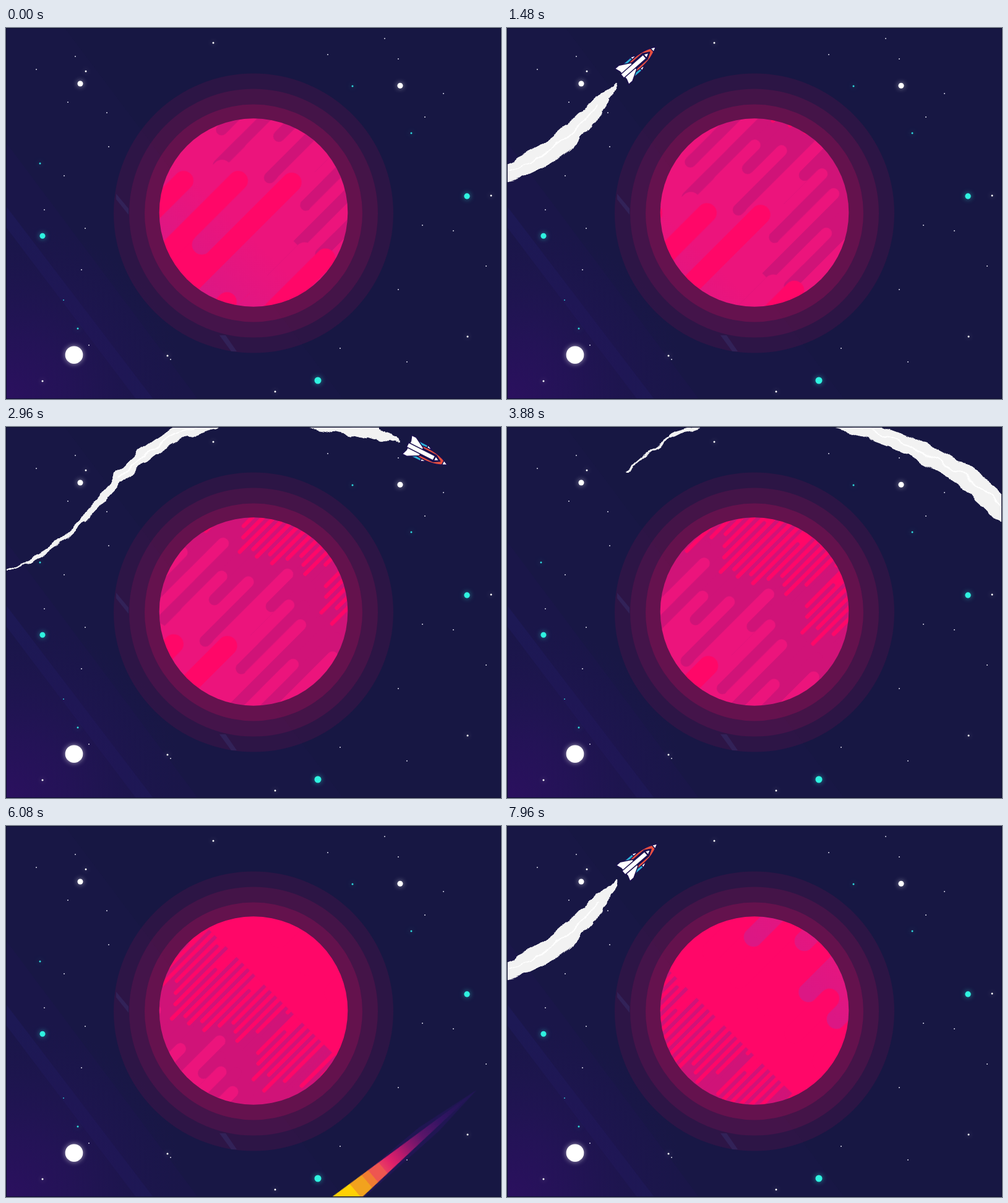
Write an HTML page without scripts that moves like this. It is 800x600 px and loops after 8 s.

```html
<!DOCTYPE html>
<html lang="en">
<head>
<meta charset="utf-8">
<title>Rocket and planet</title>
<style>
  html, body { margin: 0; width: 100%; height: 100%; overflow: hidden; background: #171743; }
  svg { display: block; width: 100%; height: 100%; }

  .red { fill: #ff0768; stroke: #ff0768; }
  .dark { fill: #d01378; stroke: #d01378; }
  .pink { fill: url(#pink); stroke: url(#pink); }
  .round { stroke-linecap: round; }
  .planet rect { stroke: none; }
  .planet path { fill: none; }
  .wide { stroke-width: 45; }
  .mid { stroke-width: 26; }
  .thin { stroke-width: 9; }
  .surface { animation: spin 8s linear infinite; }
  @keyframes spin { to { transform: translateX(-562.4px); } }

  .dots { fill: none; stroke-linecap: round; }
  .glow { filter: drop-shadow(0 0 4px #fff9); }
  .glow.cyan { filter: drop-shadow(0 0 4px #2fe9df99); }
  .pulse circle { transform-box: fill-box; transform-origin: center; opacity: 0; animation: pulse 8s linear infinite; }
  @keyframes pulse {
    0%, 21.5% { transform: scale(1); opacity: 0; }
    23% { transform: scale(1.5); opacity: .08; }
    26.5% { transform: scale(2.8); opacity: .035; }
    34%, 100% { transform: scale(4); opacity: 0; }
  }
  .blink { animation: blink 8s linear infinite; }
  @keyframes blink { 0%, 68%, 84%, 100% { opacity: 1; } 74%, 78% { opacity: 0; } }

  .rocket {
    offset-path: path("M-80 250C20 240 85 198 140 132S250 10 330 -8S470 -25 545 -6S740 60 805 138L870 220");
    offset-rotate: auto;
    animation: fly 8s linear infinite;
  }
  @keyframes fly {
    0%, 5% { offset-distance: 0%; }
    46.75%, 85.87% { offset-distance: 100%; }
    85.88% { offset-distance: 0%; }
    100% { offset-distance: 33.8%; }
  }

  /* Path length is in milliseconds: each layer shows smoke aged --a to --b. */
  .smoke use {
    stroke-dasharray: calc((var(--b) - var(--a)) * 1px) 9000px;
    animation: trail 8s linear infinite;
  }
  @keyframes trail {
    0% { stroke-dashoffset: calc((var(--b) + 400) * 1px); }
    85.87% { stroke-dashoffset: calc((var(--b) - 6470) * 1px); }
    85.88% { stroke-dashoffset: calc(var(--b) * 1px); }
    100% { stroke-dashoffset: calc((var(--b) - 1130) * 1px); }
  }

  .comet { animation: fall 8s linear infinite; }
  @keyframes fall {
    0%, 67.5% { transform: translate(1284px, -9px); }
    82.5%, 100% { transform: translate(362px, 759px); }
  }
</style>
</head>
<body>
<svg viewBox="0 0 800 600" preserveAspectRatio="none">
  <defs>
    <radialGradient id="corner" gradientUnits="userSpaceOnUse" cx="0" cy="600" r="290">
      <stop offset="0" stop-color="#2b105f"/>
      <stop offset=".35" stop-color="#26125a" stop-opacity=".8"/>
      <stop offset="1" stop-color="#1d1650" stop-opacity="0"/>
    </radialGradient>
    <linearGradient id="pink" gradientUnits="userSpaceOnUse" x1="-110" y1="0" x2="60" y2="0">
      <stop offset="0" stop-color="#dc1784"/>
      <stop offset="1" stop-color="#ec147c"/>
    </linearGradient>
    <linearGradient id="fire" gradientUnits="userSpaceOnUse" x1="0" y1="0" x2="-340" y2="0">
      <stop offset="0" stop-color="#241456" stop-opacity="0"/>
      <stop offset=".22" stop-color="#321463"/>
      <stop offset=".34" stop-color="#5b1569"/>
      <stop offset=".42" stop-color="#8f176d"/>
      <stop offset=".47" stop-color="#b91a6c"/>
      <stop offset=".53" stop-color="#e0206a"/>
      <stop offset=".58" stop-color="#e83d62"/>
      <stop offset=".58" stop-color="#ee5650"/>
      <stop offset=".64" stop-color="#ee5650"/>
      <stop offset=".64" stop-color="#f07c32"/>
      <stop offset=".68" stop-color="#f07c32"/>
      <stop offset=".68" stop-color="#f2a21e"/>
      <stop offset=".75" stop-color="#f2a21e"/>
      <stop offset=".75" stop-color="#ffd105"/>
    </linearGradient>
    <clipPath id="disc"><circle cx="400" cy="298.5" r="152.3"/></clipPath>
    <filter id="rough" filterUnits="userSpaceOnUse" x="-40" y="-40" width="880" height="680" color-interpolation-filters="sRGB">
      <feTurbulence type="fractalNoise" baseFrequency=".035" numOctaves="2" seed="4"/>
      <feDisplacementMap in="SourceGraphic" scale="15" xChannelSelector="R" yChannelSelector="G"/>
    </filter>
    <path id="route" pathLength="3340" d="M-80 250C20 240 85 198 140 132S250 10 330 -8S470 -25 545 -6S740 60 805 138L870 220"/>
  </defs>

  <rect width="800" height="600" fill="#171743"/>
  <path d="M0 0H95L545 600H0Z" fill="#191846" opacity=".6"/>
  <path d="M0 185L310 600H0Z" fill="#1d174e" opacity=".5"/>
  <path d="M0 288L238 600H210L0 322Z" fill="#1f1b5a" opacity=".7"/>
  <rect width="800" height="600" fill="url(#corner)"/>

  <g class="dots">
    <path stroke="#d5d5e6" stroke-width="2" d="M49 67h0M112 46h0M100 120h0M163 137h0M166 192h0M94 239h0M62 294h0M128 324h0M122 391h0M134 513h0M266 536h0M520 43h0M612 17h0M634 50h0M707 106h0M677 144h0M673 319h0M723 328h0M776 385h0M634 423h0M540 518h0M648 540h0"/>
    <path class="glow" stroke="#fff" stroke-width="3" d="M129 70h0M335 24h0M261 530h0M59 571h0M435 588h0M746 499h0"/>
    <path class="glow blink" stroke="#fff" stroke-width="3" d="M784 271h0"/>
    <path class="glow cyan" stroke="#2fd9dc" stroke-width="3" d="M55 219h0M116 486h0M560 94h0M655 170h0"/>
    <path stroke="#2fbfd0" stroke-width="2" d="M93 440h0"/>
  </g>
  <g class="pulse">
    <circle cx="110" cy="528" r="15" fill="#fff"/>
    <circle cx="637" cy="93" r="8" fill="#fff"/>
    <circle cx="120" cy="90" r="7" fill="#fff"/>
    <circle cx="745" cy="272" r="8" fill="#2ff3e0"/>
  </g>
  <g class="glow" fill="#fff">
    <circle cx="110" cy="528.7" r="14.3"/>
    <circle cx="120" cy="90" r="4.5"/>
    <circle cx="637" cy="93.3" r="4.5"/>
  </g>
  <g class="glow cyan" fill="#2ff3e0">
    <circle cx="59" cy="336.3" r="4.5"/>
    <circle cx="745" cy="272" r="4.7"/>
    <circle cx="504" cy="570" r="5.5"/>
  </g>

  <g fill="#e60a5e">
    <circle cx="400" cy="299.5" r="226" opacity=".1"/>
    <path d="M178 268L198 292V302L178 277ZM345 497H355L373 523H364Z" fill="#3a3a78" opacity=".35"/>
    <circle cx="400" cy="299.5" r="201" opacity=".125"/>
    <circle cx="400" cy="299.5" r="176" opacity=".2"/>
  </g>

  <!-- Surface axes: x runs up-right along the stripes, y runs across them. -->
  <g class="planet" clip-path="url(#disc)">
    <g transform="matrix(.5 -.5 .5 .5 0 0)">
      <g class="surface">
        <rect class="pink" x="-400" y="400" width="700" height="600"/>

        <rect class="dark" x="266" y="400" width="400" height="600"/>
        <path class="pink mid" d="M240 719H346"/>
        <path class="dark mid round" d="M184 513H400M122 565H400M266 616H400M184 668H400M347 719H400M198 771H400M35 822H400M143 874H400"/>
        <path class="pink mid round" d="M200 487H290M200 539H371M200 590H315M200 642H349M200 693H425M200 745H377M200 796H364M200 848H288M200 900H364"/>

        <rect class="red" x="533" y="400" width="500" height="600"/>
        <path class="dark thin" d="M500 756.5H585M500 880.5H628"/>
        <path class="dark thin round" d="M450 500H600M450 517.7H645M450 535.4H573M450 553.1H622M450 570.8H533M450 588.5H610M450 606.2H642M450 623.9H584M450 641.6H636M450 659.3H553M450 677H618M450 694.7H643M450 712.4H608M450 730.1H642M450 747.8H616M450 765.5H641M450 783.2H544M450 800.9H637M450 818.6H656M450 836.3H610M450 854H650M450 871.7H656M450 889.4H653M450 907H650"/>
        <path class="red thin round" d="M363 491.1H760M425 508.8H760M453 526.5H760M432 544.2H760M413 562H760M384 579.6H760M410 597.3H760M404 615H760M429 632.7H760M418 650.4H760M450 668.1H760M477 685.8H760M466 703.5H760M454 721.2H760M502 739H760M581 756.6H760M468 774.3H760M451 792H760M418 809.7H760M450 827.4H760M417 845.1H760M466 862.8H760M624 880.5H760M485 898.2H760"/>

        <g id="bands">
          <rect class="red" x="-300" y="400" width="266" height="600"/>
          <path class="pink wide" d="M-86 800H120M-60 489H120"/>
          <path class="pink wide round" d="M-109 578H120M-34 667H120M-110 756H120M-108 845H120"/>
          <path class="red wide round" d="M-200 534H40M-200 622H128M-200 711.5H212M-200 800H-86M-200 889H144"/>
        </g>
        <use href="#bands" x="888"/>
      </g>
    </g>
  </g>

  <g class="comet">
    <g transform="rotate(-39.8)">
      <path d="M0 0L-110 -13H-300L-345 0L-300 19L-90 12Z" fill="#26145e" opacity=".6"/>
      <path d="M0 0L-310 -18Q-342 -16 -342 0Q-342 16 -310 18Z" fill="url(#fire)"/>
    </g>
  </g>

  <g class="smoke" filter="url(#rough)" fill="none" stroke="#f2f2f2" stroke-linecap="round">
    <use href="#route" stroke-width="3" style="--a:150;--b:2480"/>
    <use href="#route" stroke-width="6" style="--a:165;--b:2200"/>
    <use href="#route" stroke-width="10" style="--a:185;--b:1850"/>
    <use href="#route" stroke-width="14" style="--a:210;--b:1720"/>
    <use href="#route" stroke-width="18" style="--a:240;--b:1600"/>
    <use href="#route" stroke-width="22" style="--a:275;--b:1450"/>
    <use href="#route" stroke-width="26" style="--a:320;--b:1200"/>
    <use href="#route" stroke-width="30" style="--a:390;--b:940"/>
    <use href="#route" stroke-width="34" style="--a:480;--b:760"/>
    <use href="#route" stroke="#fff" stroke-width="2" style="--a:300;--b:1600"/>
  </g>

  <g class="rocket" stroke="#1d1150" stroke-width="1.5" stroke-linejoin="round">
    <g id="side">
      <path d="M-22 -14H-5V-8H-22Z" fill="#2bb3d6"/>
      <path d="M-5 -14.500L3 -11L-5 -7.500Z" fill="#fff"/>
    </g>
    <use href="#side" transform="scale(1 -1)"/>
    <path d="M-18 -9Q16 -13 36 0Q16 13 -18 9Z" fill="#e8503f"/>
    <path d="M29 -4L37 0L29 4Z" fill="#fff"/>
    <path d="M-20 -6H14L24 0L14 6H-20Z" fill="#1d1150"/>
    <path d="M-36 -17H-28L-10 -7V7L-28 17H-36L-33 8V-8Z" fill="#fff"/>
    <path d="M-35 -4H13V4H-35Z" fill="#fff"/>
    <path d="M14 -4L22 0L14 4Z" fill="#fff"/>
  </g>

  <rect x=".5" y=".5" width="799" height="599" fill="none" stroke="#0e0e30"/>
</svg>
</body>
</html>
```
